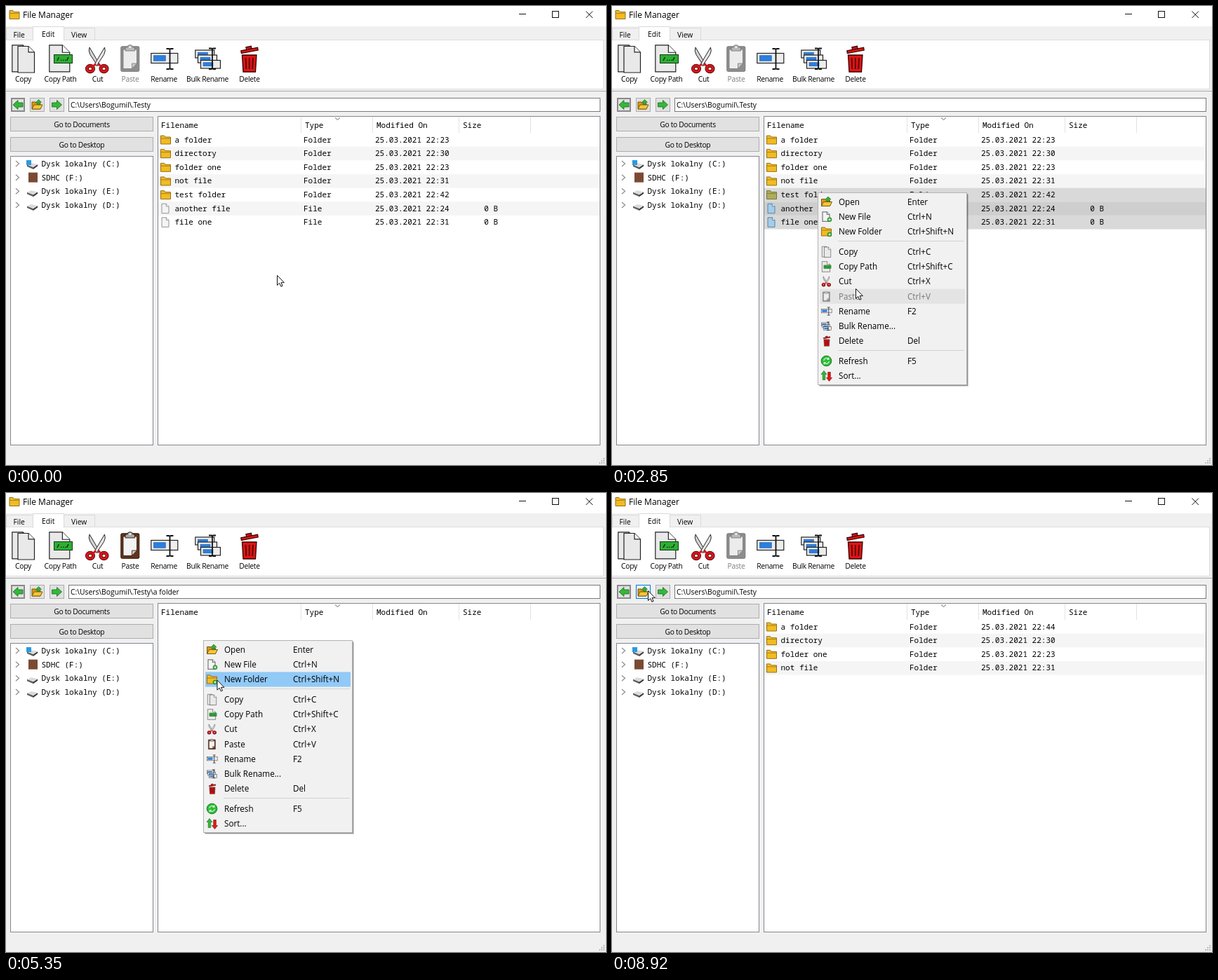
Write an HTML page that moves like this. It is 855 by 655 pixels and loops after 9.36 s.

```html
<!DOCTYPE html>
<html lang="en">
<head>
<meta charset="utf-8">
<title>File Manager</title>
<style>
html, body { margin: 0; width: 100%; height: 100%; overflow: hidden; background: #f0f0f0; }
svg { display: block; }
text { font: 11px "Noto Sans Mono", monospace; fill: #000; white-space: pre; }
.ui { font: 10.3px "Open Sans", "Noto Sans", sans-serif; }
.tight { letter-spacing: -.3px; }
.big { font: 12px "Open Sans", "Noto Sans", sans-serif; }
.menu { font: 11.7px "Open Sans", "Noto Sans", sans-serif; }
</style>
</head>
<body>
<svg width="855" height="655" viewBox="0 0 855 655"><g id="fixed"></g><g id="live"></g></svg>
<script>
const LOOP = 9360, TICK = 60.78;
const HOME = 'C:\\Users\\Bogumil\\.Testy';

// Basic shapes
const rect = (x, y, w, h, fill, stroke = 'none', extra = '') =>
  `<rect x="${x}" y="${y}" width="${w}" height="${h}" fill="${fill}" stroke="${stroke}" ${extra}/>`;
const box = (x, y, w, h, fill, stroke, extra) => rect(x + .5, y + .5, w - 1, h - 1, fill, stroke, extra);
const path = (d, fill = 'none', stroke = 'none', width = 1, extra = '') =>
  `<path d="${d}" fill="${fill}" stroke="${stroke}" stroke-width="${width}" ${extra}/>`;
const ring = (x, y, color, width) =>
  `<ellipse cx="${x}" cy="${y}" rx="4.6" ry="4.2" fill="none" stroke="${color}" stroke-width="${width}"/>`;
const text = (x, y, s, cls = '', extra = '') => `<text x="${x}" y="${y}" class="${cls}" ${extra}>${s}</text>`;
const mid = 'text-anchor="middle"', end = 'text-anchor="end"';
const place = (x, y, s, body, extra = '') => `<g transform="translate(${x} ${y}) scale(${s})" ${extra}>${body}</g>`;

const page = (x, y, w, h, fill = '#e9e9e9', line = '#222', sw = 1.2) => {
  const f = w * .36;
  return path(`M${x} ${y}h${w - f}l${f} ${f}v${h - f}h${-w}z`, fill, line, sw) +
    path(`M${x + w - f} ${y}v${f}h${f}`, '#fff', line, sw);
};
const folder = (fill = '#f2bb20', line = '#94701a') =>
  path('M.5 1.5h5l1.5 2h7.5v10h-14z', fill, line) + path('M1 5.5h13', 'none', line, .8);
const openFolder =
  path('M.5 3.5h5l1 2h6v8h-12z', '#d79a13', '#7a5a10') +
  path('M.5 13.5l3-6h12l-3 6z', '#f8c436', '#7a5a10') +
  path('M10 0l4 4h-2.3v3h-3.4v-3h-2.3z', '#32b432', '#14661a', .6);
const ibeam = (x, y, h) =>
  path(`M${x - 5} ${y}h3.5q1.5 0 1.5 1.5q0-1.5 1.5-1.5h3.5M${x} ${y}v${h}M${x - 5} ${y + h}h3.5q1.5 0 1.5-1.5q0 1.5 1.5 1.5h3.5`, 'none', '#111', 1.8);
const field = (x, y, w, h, fw) =>
  rect(x, y, w, h, '#ededed', '#222', 'stroke-width="1.2"') + rect(x + 3.5, y + 3.2, fw, h - 6.4, '#2b7fdd', '#1b5ca8', 'stroke-width=".6"');

const icons = {
  copy: page(.8, .8, 24, 38) + page(9, 2.5, 23.5, 37.5),
  path: page(.8, .8, 29, 38) + rect(7.5, 14.5, 26, 12, '#2fad34', '#123c14') +
    path('M12 23l2.5-5M25.5 23l2.5-5M17 22.3h1.4M20 22.3h1.4M23 22.3h1.4', 'none', '#0a250b', 1.3),
  cut: path('M5.5 1q-2 5 1 10.5l10.5 16 3-2z', '#d4d4d4', '#222') +
    path('M27 1q2 5-1 10.5l-10.5 16-3-2z', '#e6e6e6', '#222') +
    [6.5, 26].map(x => ring(x, 31.5, '#3a0505', 5) + ring(x, 31.5, '#d5161a', 3.6)).join('') +
    path('M10 28.5l4.5-4M22.5 28.5l-4.5-4', 'none', '#d5161a', 3),
  paste: on => {
    const line = on ? '#2c1408' : '#777';
    return rect(.8, 2.8, 26, 35.5, on ? '#64331b' : '#8d8d8d', line, 'rx="1.5"') +
      path('M4 7h19.5v20l-7 7.5h-12.5z', on ? '#f3f3f3' : '#ececec', line, .8) +
      path('M23.5 27h-7v7.5z', '#c9c9c9', line, .8) +
      path('M7 9v-5h3q0-3.4 3.8-3.4t3.8 3.4h3v5z', on ? '#a9a9a9' : '#b9b9b9', line, .9) +
      `<circle cx="13.8" cy="3.7" r="1.2" fill="#fff"/>`;
  },
  rename: field(.8, 7.5, 38, 14, 17) + ibeam(27.5, 1, 29),
  bulk: field(.8, 4, 27, 11, 14) + field(4.5, 11, 27, 11, 14) + field(8.5, 18.5, 28, 11.5, 14) + ibeam(25, 1.5, 29.5),
  del: path('M2.5 14h20.5l-1.5 24h-17.5z', '#dd1515', '#300', 1.3) +
    path('M7.5 18l.8 16M12.8 18v16M18 18l-.8 16', 'none', '#5c0505', 1.9) +
    path('M.8 7.8l23.8-4.6.6 3.8-23.8 4.6zM8.5 6l-.6-3.2 7.5-1.5.6 3.2', '#dd1515', '#300', 1.2),
  arrow: path('M0 6.5l7-6.5v3.5h7v6h-7v3.5z', '#34b83a', '#176b1b', .8),
  plus: `<circle cx="12" cy="11.5" r="3" fill="#35b53b" stroke="#176b1b" stroke-width=".6"/>` + path('M10.4 11.5h3.2M12 9.9v3.2', 'none', '#fff', .9),
  refresh: `<circle cx="7.5" cy="7.5" r="7.3" fill="#2fbd3a" stroke="#157a1e"/>` +
    path('M3.8 7a3.8 3.8 0 0 1 6.6-2.2M11.2 8a3.8 3.8 0 0 1-6.6 2.2M10.8 2.6v2.6h-2.6M4.2 12.4v-2.6h2.6', 'none', '#d8ffd8', 1.2),
  sort: path('M4 0l4 5h-2.2v8h-3.6v-8h-2.2z', '#2fb83a', '#156b1c', .6) + path('M11.5 15l4-5h-2.2v-8h-3.6v8h-2.2z', '#e01a1a', '#700', .6),
};

const drive = (x, y) => place(x, y, 1,
  path('M0 2.5l9 3.5 6-4v2.5l-6 4.5-9-4z', '#5f5f5f') +
  path('M0 2.5l6-2.5 9 2-6 4z', '#dadada') + path('M9 7.5l6-4.2', 'none', '#333', 1.4));

// Everything that never changes
function chrome() {
  let s = rect(0, 0, 855, 655, '#f0f0f0') + rect(0, 0, 855, 29, '#fff');
  s += place(4.5, 5, 1, folder()) + text(24, 17, 'File Manager', 'big');
  s += path('M731 11.5h10M826.5 7.5l9.5 9.5M836 7.5l-9.5 9.5', 'none', '#111') + rect(778.5, 7.5, 9, 9, 'none', '#111');
  s += box(0, 31, 39, 18, '#f0f0f0', '#dadada') + box(82, 31, 45, 18, '#f0f0f0', '#dadada');
  s += box(-1, 48, 853, 71, '#fff', '#dcdcdc') + path('M38.5 49.5v-20h44v20', '#fff', '#dadada') + rect(39, 48, 43, 2, '#fff');
  s += text(10.5, 44.5, 'File', 'ui') + text(51, 43.5, 'Edit', 'ui') + text(93, 44.5, 'View', 'ui');
  const tools = [['copy', 8, 55, 24.5, 'Copy'], ['path', 61, 55, 77.5, 'Copy Path'], ['cut', 113.5, 58, 130.5, 'Cut'],
    ['rename', 206, 60, 225, 'Rename'], ['bulk', 269, 59, 287, 'Bulk Rename'], ['del', 334, 56, 347, 'Delete']];
  for (const [id, x, y, cx, label] of tools) s += place(x, y, 1, icons[id]) + text(cx, 108, label, 'ui tight', mid);
  s += path('M0 121.5h855', 'none', '#a8a8a8');
  s += box(7, 131, 20, 20, '#e1e1e1', '#8a8a8a') + rect(8.5, 132.5, 17, 17, 'none', '#333', 'stroke-dasharray="1 1"');
  s += place(10, 134.5, 1, icons.arrow) + box(62, 131, 21, 20, '#e1e1e1', '#adadad') + place(79.5, 134.5, '-1 1', icons.arrow);
  s += box(89, 131, 758, 20, '#fff', '#7a7a7a');
  s += box(6, 214, 204, 413, '#fff', '#828790') + box(216, 157, 631, 470, '#fff', '#828790');
  for (const x of [421, 523, 646, 748]) s += path(`M${x - .5} 158v23`, 'none', '#e3e3e3');
  [[221, 'Filename'], [426, 'Type'], [528, 'Modified On'], [651, 'Size']].forEach(([x, t]) => s += text(x, 173.5, t));
  s += path('M469 159.5l3.5 3 3.5-3', 'none', '#666');
  for (let i = 0; i < 3; i++) for (let j = 0; j <= i; j++) s += rect(851 - 3 * j, 645 + 3 * i, 2, 2, '#bdbdbd');
  return s;
}

const row = (name, type, date, size = '') => ({ name, type, date: '25.03.2021 22:' + date, size });
const dir = (name, date) => row(name, 'Folder', date);
const loose = [row('another file', 'File', '24', '0 B'), row('file one', 'File', '31', '0 B')];
const rest = [dir('directory', '30'), dir('folder one', '23'), dir('not file', '31')];
const lists = {
  start: [dir('a folder', '23'), ...rest, dir('test folder', '42'), ...loose],
  empty: [],
  pasted: [dir('test folder', '44'), ...loose],
  end: [dir('a folder', '44'), ...rest],
};

// Pointer: tick, x, y
const moves = [[3, 387, 385], [6, 371, 381], [8, 371, 381], [19, 291, 263], [20, 290, 262], [26, 290, 262], [27, 293, 265],
  [40, 293, 265], [47, 348, 404], [50, 348, 404], [54, 344, 394], [58, 344, 394], [63, 275, 217], [66, 269, 196],
  [73, 269, 196], [77, 281, 209], [85, 281, 209], [92, 333, 358], [100, 333, 358], [116, 52, 140]];
const clicks = [[7, 20], [32, 34], [55, 57], [67, 68], [70, 71], [80, 82], [93, 97], [121, 122]];
const within = (k, a, b) => k >= a && k <= b;

function pointer(k) {
  const i = moves.findIndex(m => m[0] > k);
  if (i === 0) return moves[0].slice(1);
  if (i < 0) return moves[moves.length - 1].slice(1);
  const [a, x, y] = moves[i - 1], [b, X, Y] = moves[i], u = (k - a) / (b - a), e = u * u * (3 - 2 * u);
  return [x + (X - x) * e, y + (Y - y) * e];
}

const rowTop = i => 181 + 19.65 * i;

function fileRows(list, hover, picked, cut) {
  return list.map((f, i) => {
    const y = rowTop(i), on = picked(i), faded = cut && i > 3, base = y + 13.5;
    let s = '';
    if (on && hover === i) s += rect(217.5, y + .5, 628, 18.5, '#cce8ff', '#99d1ff');
    else if (on || hover === i || i % 2) s += rect(217, y, 629, 19.65, on ? (i % 2 ? '#cecece' : '#d9d9d9') : hover === i ? '#e5f3ff' : '#f5f5f5');
    const icon = f.type === 'Folder'
      ? place(220, y + 2.5, 1, folder(on ? '#b0ad58' : undefined, on ? '#77733a' : undefined), faded ? 'opacity=".45"' : '')
      : place(221.5, y + 2.5, 1, page(.5, .5, 10, 13.5, on ? '#a5cdeb' : '#f4f4f4', on ? '#4f7c9c' : '#8a8a8a', .9), faded ? 'opacity=".5"' : '');
    return s + icon + text(240.5, base, f.name) + text(424, base, f.type) + text(526, base, f.date) + text(701, base, f.size, '', end);
  }).join('');
}

function tree([px, py]) {
  return ['Dysk lokalny (C:)', 'SDHC (F:)', 'Dysk lokalny (E:)', 'Dysk lokalny (D:)'].map((name, i) => {
    const c = 225 + 19.65 * i;
    let s = within(px, 7, 209) && Math.abs(py - c) < 9.8 ? rect(7, c - 9.8, 202, 19.6, '#e5f3ff') : '';
    s += path(`M14 ${c - 4}l4.5 4-4.5 4`, 'none', '#909090', 1.3);
    s += i === 1 ? rect(32, c - 7, 13, 14, '#7b4a34') : drive(30, c - 1);
    if (i === 0) s += rect(29, c - 5, 7, 7, '#2a9be0');
    return s + text(50.5, c + 4, name);
  }).join('');
}

function button(y, label, heat) {
  const fill = ['#e1e1e1', '#e3e9ee', '#e5f1fb'][heat], line = ['#adadad', '#5a94c2', '#0078d7'][heat];
  return box(6, y, 204, 21, fill, line) + text(108, y + 14.5, label, 'ui tight', mid);
}

const entries = [[13.5, 'Open', 'Enter'], [34.8, 'New File', 'Ctrl+N'], [56, 'New Folder', 'Ctrl+Shift+N'],
  [84.5, 'Copy', 'Ctrl+C'], [105.8, 'Copy Path', 'Ctrl+Shift+C'], [127, 'Cut', 'Ctrl+X'], [148.3, 'Paste', 'Ctrl+V'],
  [169.5, 'Rename', 'F2'], [190.8, 'Bulk Rename...', ''], [212, 'Delete', 'Del'], [240.5, 'Refresh', 'F5'], [262, 'Sort...', '']];

function menu(x, y, px, py, canPaste) {
  const small = [openFolder, page(2, .5, 10, 13.5, '#f4f4f4', '#777') + icons.plus, folder() + icons.plus,
    place(1, 0, .39, icons.copy), place(1, 0, .39, icons.path), place(1, 0, .39, icons.cut), place(2, 0, .39, icons.paste(canPaste)),
    place(0, 1.5, .39, icons.rename), place(0, 1, .4, icons.bulk), place(3, 0, .39, icons.del), icons.refresh, icons.sort];
  let s = rect(3, 3, 212, 274, '#000', 'none', 'opacity=".18"') + rect(2, 2, 212, 274, '#000', 'none', 'opacity=".3"');
  s += box(0, 0, 213, 275, '#f1f1f1', '#b4b4b4') + path('M29 69.5h180M29 225.5h180', 'none', '#d2d2d2');
  entries.forEach(([c, label, key], i) => {
    const off = i === 6 && !canPaste, style = off ? 'style="fill:#777"' : '';
    if (px > x + 2 && Math.abs(py - y - c) < 10.65) s += rect(3, c - 10.6, 207, 21.2, off ? '#e4e4e4' : '#91c9f7');
    s += place(5, c - 7.5, 1, small[i]) + text(30, c + 4.2, label, 'menu', style) + text(128, c + 4.2, key, 'menu', style);
  });
  return place(x, y, 1, s);
}

function scene(k) {
  const [px, py] = pointer(k), past = pointer(k - 1);
  const state = k < 72 ? 'start' : k < 97 ? 'empty' : k < 122 ? 'pasted' : 'end';
  const menuOpen = within(k, 33, 57) || within(k, 82, 96), canPaste = within(k, 58, 96);
  const dragging = within(k, 8, 20), top = k < 20 ? py : 262;
  const picked = i => k < 8 ? false : k < 58 ? i >= 4 && rowTop(i + 1) > top : within(k, 67, 71) && i === 0;
  const hover = menuOpen || past[0] < 217 ? -1 : Math.floor((past[1] - 181) / 19.65);

  let s = place(163, 55, 1, icons.paste(canPaste)) + text(177, 108, 'Paste', 'ui tight', mid + (canPaste ? '' : ' style="fill:#7d7d7d"'));
  s += text(92, 145, HOME + (within(k, 72, 121) ? '\\a folder' : ''), 'ui');
  const hot = k >= 115, down = within(k, 121, 122);
  s += box(34, 131, 21, 20, down ? '#cce4f7' : hot ? '#e5f1fb' : '#e1e1e1', hot ? '#0078d7' : '#adadad') + place(36.5, 133.5, 1, openFolder);
  const over = y => px < 210 && within(py, y, y + 21);
  s += button(158, 'Go to Documents', over(158) || k === 116 ? 2 : k === 117 ? 1 : 0) + button(187, 'Go to Desktop', over(187) ? 2 : 0);
  s += tree([px, py]) + fileRows(lists[state], hover, picked, within(k, 58, 71));
  const status = within(k, 58, 85) ? 'File copied to clipboard!' : within(k, 97, 146) ? 'File pasted!' : '';
  s += text(1.5, 651, status, 'big');
  if (dragging) s += rect(px + .5, py + .5, Math.max(0, 371 - px), Math.max(0, 381 - py - 1), 'rgba(0,110,190,.29)', '#1b6fb5');
  if (menuOpen) s += k < 58 ? menu(293, 266, px, py, false) : menu(281, 210, px, py, true);
  if (clicks.some(c => within(k, ...c))) s += `<circle cx="${px}" cy="${py}" r="12" fill="#f0e800" opacity=".6"/>`;
  return s + place(px - .5, py - .5, 1, path('M0 0v14l3.2-3 2.2 4.8 2.2-1-2.1-4.6h4.4z', '#fff', '#111'));
}

const live = document.getElementById('live');
document.getElementById('fixed').innerHTML = chrome();
let shown = -1;
const began = performance.now();
function draw(now) {
  const t = Math.max(0, now - began) % LOOP;
  const k = Math.min(153, Math.floor((t + 16) / TICK));
  if (k !== shown) live.innerHTML = scene(shown = k);
  requestAnimationFrame(draw);
}
draw(began);
</script>
</body>
</html>
```
